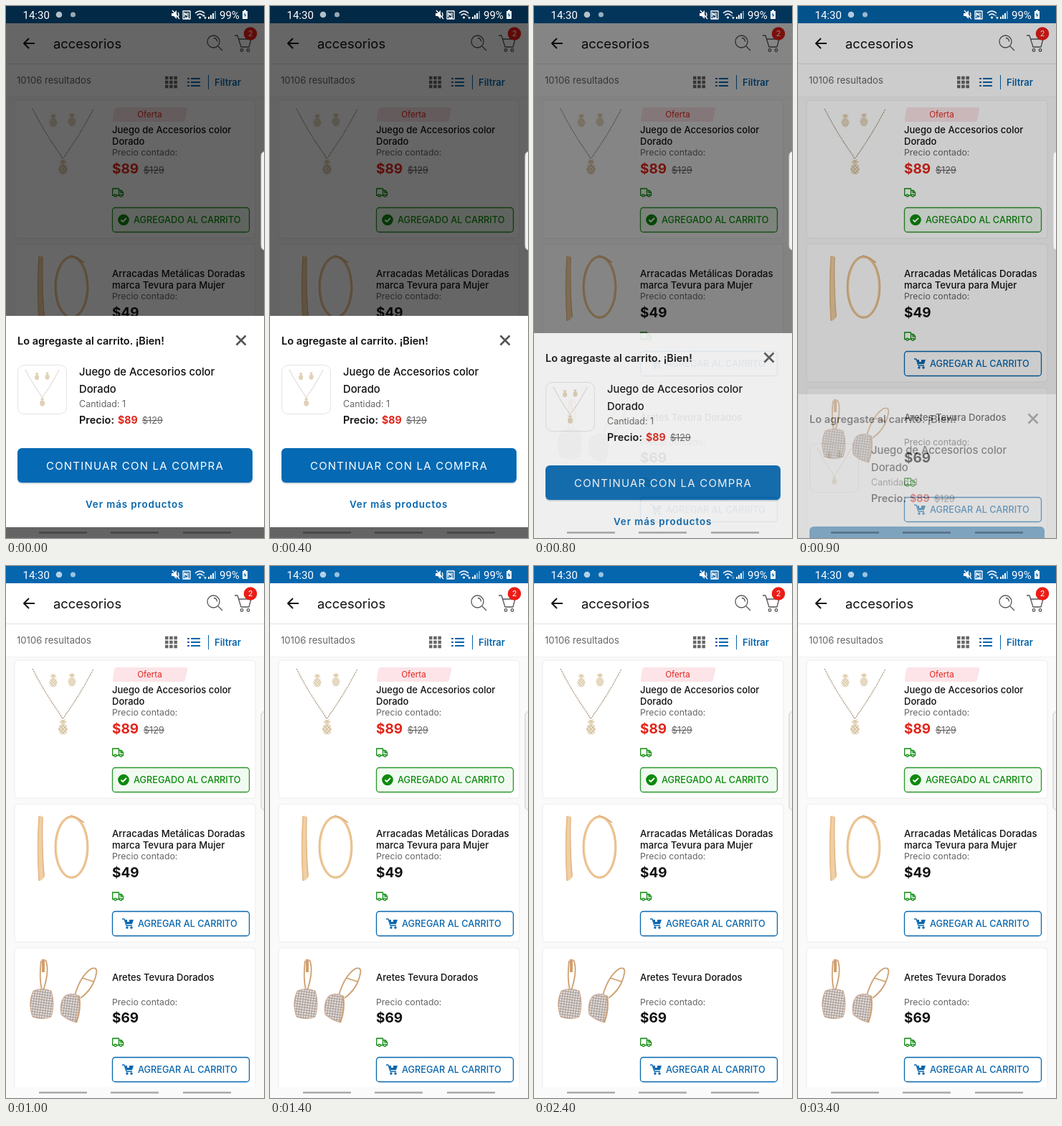
An HTML page for the animation above (3500 ms loop, 360 by 740 pixels).

```html
<!DOCTYPE html>
<html lang="es">
<head>
<meta charset="utf-8">
<title>Carrito</title>
<style>
html, body { margin: 0; height: 100%; overflow: hidden; background: #fafafa; }
svg { display: block; width: 360px; height: 740px; font-family: Inter, sans-serif; font-size: 13px; fill: #111; }
.status { font: 15px Roboto, sans-serif; fill: #fff; }
.grey { fill: #666; }
.red { fill: #e1251b; }
.blue { fill: #0566ae; }
.green { fill: #0c8a0c; }
.small { font-size: 12.3px; }
.old { font-size: 12.6px; fill: #666; text-decoration: line-through; }
.price { font-size: 19px; font-weight: 700; }
.name { font-weight: 450; }
.label { font-size: 12.7px; font-weight: 450; }
.bold { font-size: 14.5px; font-weight: 600; }
.line { fill: none; stroke-width: 1.3; stroke-linejoin: round; }
.card { fill: #fff; stroke: #ececec; }
</style>
</head>
<body>
<svg viewBox="0 0 360 740">
  <defs>
    <pattern id="gems" width="3.600" height="3.600" patternUnits="userSpaceOnUse" patternTransform="rotate(8)">
      <rect width="3.600" height="3.600" fill="#a89c96"/><circle cx="1.800" cy="1.800" r="1.400" fill="#ebe8e7"/>
    </pattern>
    <pattern id="gold" width="3" height="3" patternUnits="userSpaceOnUse" patternTransform="rotate(45)">
      <rect width="3" height="3" fill="#cdb893"/><circle cx="1.500" cy="1.500" r="1.200" fill="#faf4e8"/>
    </pattern>
    <g id="pineapple">
      <ellipse rx="5.500" ry="6.500" fill="url(#gold)"/>
      <path d="M0-6L-5-9L-2-9.500L-3-12L0-11L3-12L2-9.500L5-9Z" fill="#e0cfae"/>
    </g>
    <g id="necklace">
      <path d="M37 143Q55 178 76 207Q78 212 79 212Q81 211 83 207Q104 178 122 143" class="line" stroke="#ab9a85" stroke-dasharray="2 1"/>
      <use href="#pineapple" x="66" y="162"/>
      <use href="#pineapple" x="92" y="161"/>
      <use href="#pineapple" transform="translate(79.500 227) scale(1.150)"/>
    </g>
    <g id="delivery" class="line" stroke="#0c8a0c">
      <path d="M3 10.500H.7V1H9.500V10.500H6M9.500 3.500H13L15.500 6.500V10.500H14M9.500 10.500H10.500M12 3.500V6.500H15"/>
      <circle cx="4.500" cy="10.700" r="1.600"/><circle cx="12.300" cy="10.700" r="1.600"/>
    </g>
    <g id="add">
      <rect x="148.500" y=".5" width="191" height="34" rx="4" fill="#fff" stroke="#0566ae" stroke-width="1.300"/>
      <path d="M162 11H165L168 20H176" class="line" stroke="#0566ae"/>
      <path d="M166 12H169V15H172V12H178L176 18H168Z" class="blue"/>
      <circle cx="169" cy="23" r="1.700" class="blue"/><circle cx="175" cy="23" r="1.700" class="blue"/>
      <text x="184" y="22" class="blue label">AGREGAR AL CARRITO</text>
    </g>
  </defs>

  <rect width="360" height="740" fill="#fafafa"/>
  <rect y="24" width="360" height="102" fill="#fff"/>
  <path d="M0 80.500H360" stroke="#e2e2e2"/>
  <path d="M0 126.500H360" stroke="#f1f1f1"/>
  <rect width="360" height="24" fill="#0566ae"/>

  <path d="M40 52H25M32 45L25 52L32 59" class="line" stroke="#151515" style="stroke-width:2"/>
  <text x="66" y="58.500" font-size="18.400">accesorios</text>
  <g class="line" stroke="#555" style="stroke-width:1.300">
    <circle cx="289.500" cy="49.500" r="8.500"/><path d="M296 56L302 62M290 44.500Q294.500 45 294.500 49.500"/>
    <path d="M319 41H323L328 57H339L342 46H325"/>
    <circle cx="329" cy="61.500" r="1.800"/><circle cx="338" cy="61.500" r="1.800"/>
  </g>
  <circle cx="341" cy="38.500" r="9.300" fill="#ed1c16"/>
  <text x="341" y="42.300" font-size="11" text-anchor="middle" style="fill:#fff">2</text>

  <text x="15" y="107.500" font-size="13.100" class="grey">10106 resultados</text>
  <path d="M222 100H239M222 106H239M222 112H239" stroke="#666" stroke-width="4.500" stroke-dasharray="4.500 1.700"/>
  <path d="M258 101H271M258 106H271M258 111H271M253 101H256M253 106H256M253 111H256" stroke="#0566ae" stroke-width="2"/>
  <path d="M282.500 96V116" stroke="#0566ae"/>
  <text x="291" y="110.500" class="blue" font-weight="600">Filtrar</text>

  <rect x="12" y="131" width="336" height="192" rx="4" class="card"/>
  <use href="#necklace"/>
  <path d="M154 141H251Q254 141 253 144L250 158Q249 161 246 161H151Q148 161 149 158L151 144Q152 141 154 141Z" fill="#fce4e8"/>
  <text x="200.500" y="155" font-size="11.600" text-anchor="middle" class="red">Oferta</text>
  <text x="148" y="176.500" class="name">Juego de Accesorios color</text>
  <text x="148" y="192.500" class="name">Dorado</text>
  <text x="148" y="208" class="grey small">Precio contado:</text>
  <text x="148" y="232.500" class="red price">$89</text>
  <text x="192" y="232.500" class="old">$129</text>
  <use href="#delivery" x="148" y="253"/>
  <rect x="148.500" y="280.500" width="191" height="34" rx="4" fill="#f1faf1" stroke="#2b962b" stroke-width="1.300"/>
  <circle cx="164" cy="297.500" r="7.800" class="green"/>
  <path d="M160.500 297.500L163 300L168 295" class="line" stroke="#fff" style="stroke-width:1.800"/>
  <text x="178" y="302" class="green label">AGREGADO AL CARRITO</text>

  <rect x="12" y="331" width="336" height="192" rx="4" class="card"/>
  <path d="M46 348Q42 392 46 438Q50 438 54 432Q50 392 51 349Q48 346 46 348Z" fill="#f0cfa4"/>
  <g class="line" stroke="#e2b27c">
    <path d="M46 348Q43 392 46 438M51 349Q50 392 53 432"/>
    <ellipse cx="91.500" cy="391" rx="22" ry="42" stroke="#efc998" style="stroke-width:3"/>
    <ellipse cx="91.500" cy="391" rx="23.300" ry="43.300" style="stroke-width:1"/>
    <path d="M90 347L99 350L109 357" style="stroke-width:1.800"/>
  </g>
  <text x="148" y="376.500" class="name" font-size="13.200">Arracadas Metálicas Doradas</text>
  <text x="148" y="392.500" class="name" font-size="13.200">marca Tevura para Mujer</text>
  <text x="148" y="408" class="grey small">Precio contado:</text>
  <text x="148" y="432.500" class="price">$49</text>
  <use href="#delivery" x="148" y="453"/>
  <use href="#add" y="480"/>

  <path d="M12 740V535Q12 531 16 531H344Q348 531 348 535V740" class="card"/>
  <g class="line" stroke="#cf9f70" style="stroke-width:1.800">
    <path d="M50 590Q46 572 49 549M55 548Q59 556 57 570Q55 582 52 590"/>
    <path d="M52 547V565" style="stroke-width:4"/>
    <path d="M96 597Q104 570 119 560Q128 557 126 567Q122 588 104 601M106 573L122 578"/>
  </g>
  <path d="M38 591Q50 586 63 591Q69 610 63 627Q50 632 37 627Q30 608 38 591Z" fill="url(#gems)" stroke="#cda488"/>
  <path d="M81 599Q91 592 102 598Q105 617 98 635Q86 632 77 624Q74 610 81 599Z" fill="url(#gems)" stroke="#cda488"/>
  <path d="M102 598Q105 617 98 635" class="line" stroke="#cf9f70" style="stroke-width:2.200"/>
  <text x="148" y="576.500" class="name">Aretes Tevura Dorados</text>
  <text x="148" y="611" class="grey small">Precio contado:</text>
  <text x="148" y="635" class="price">$69</text>
  <use href="#delivery" x="148" y="656"/>
  <use href="#add" y="683"/>
  <rect y="725" width="360" height="15" fill="#fafafa"/>

  <rect id="scrim" width="360" height="740" fill="#000"/>

  <g id="sheet">
    <rect y="431" width="360" height="294" fill="#fff"/>
    <text x="16" y="470.500" class="bold">Lo agregaste al carrito. ¡Bien!</text>
    <path d="M321.500 458.500L334.500 471.500M334.500 458.500L321.500 471.500" stroke="#555" stroke-width="2.600"/>
    <rect x="16.500" y="499.500" width="68" height="68" rx="9" fill="#fff" stroke="#e4e4e4"/>
    <use href="#necklace" transform="translate(6.500 426.600) scale(.555)"/>
    <text x="102" y="514" class="name" font-size="14.800">Juego de Accesorios color</text>
    <text x="102" y="538" class="name" font-size="14.800">Dorado</text>
    <text x="102" y="558" font-size="12.500" class="grey">Cantidad: 1</text>
    <text x="102" y="580.500" class="bold">Precio:</text>
    <text x="156" y="580.500" font-size="14.200" font-weight="700" class="red">$89</text>
    <text x="190" y="580.500" class="old">$129</text>
    <rect x="16" y="617" width="328" height="48" rx="6" fill="#d5dde4"/>
    <rect x="16" y="615" width="328" height="48" rx="6" fill="#0569b3"/>
    <text x="56" y="644.500" font-size="15" letter-spacing="1.200" style="fill:#fff">CONTINUAR CON LA COMPRA</text>
    <text x="111" y="698" font-size="13.400" font-weight="600" letter-spacing=".9" class="blue">Ver más productos</text>
  </g>

  <g class="status">
    <text x="23.500" y="17.500">14:30</text>
    <circle cx="74" cy="12" r="4.300" opacity=".7"/>
    <circle cx="93.500" cy="12" r="3.500" opacity=".6"/>
    <path d="M231 10H234L238 6V18L234 14H231Z"/>
    <path d="M232 6L242 18" class="line" stroke="#fff"/>
    <path d="M240 9Q242 12 240 15" class="line" stroke="#fff"/>
    <rect x="247" y="7" width="10" height="11" class="line" stroke="#fff"/>
    <path d="M249 15V9.500L252 13V9.500M254 9V16M249 16.500H255" class="line" stroke="#fff"/>
    <path d="M264 10Q270.500 4 277 10M266.500 13Q270.500 9 274.500 13" class="line" stroke="#fff" style="stroke-width:1.600"/>
    <circle cx="270.500" cy="16" r="1.600"/>
    <path id="up" d="M274 14.500L276 11.500L278 14.500Z"/>
    <path id="down" d="M276 15.500H280L278 18.500Z"/>
    <path d="M283 18V15M286 18V12.500" stroke="#fff" stroke-width="2"/>
    <path id="bar" d="M289 18V10" stroke="#fff" stroke-width="2"/>
    <path d="M292 18V7" stroke="#fff" stroke-width="2" opacity=".45"/>
    <text x="298" y="17.500">99%</text>
    <path d="M330 7H332V5.500H335V7H337V18H330Z"/>
    <path d="M334 8.500L331.500 13H333.500L333 16.500L335.500 12H333.500Z" fill="#0566ae"/>
  </g>
  <path d="M361 202.500Q356 203 356 209V333Q356 339 361 339.500Z" fill="#f4f4f4" stroke="#c8c8c8"/>
  <path d="M46 732.500H113M146 732.500H213M247 732.500H314" stroke="#000" stroke-width="2.600" stroke-opacity=".32"/>
</svg>
<script>
const el = id => document.getElementById(id);
const show = (id, opacity) => el(id).setAttribute('opacity', opacity);

// [start ms, sheet offset, sheet opacity, scrim opacity]
const steps = [[0, 0, 1, .6], [800, 24, .87, .48], [900, 109, .38, .2], [1000, 300, 0, 0]];

function frame(now) {
  const t = now % 3500;
  const [, y, alpha, dim] = steps.findLast(s => s[0] <= t);
  el('sheet').setAttribute('transform', `translate(0 ${y})`);
  show('sheet', alpha);
  show('scrim', dim);

  const tick = Math.floor((t + 600) / 1000);
  show('up', tick % 2 ? .4 : 1);
  show('down', tick === 3 ? .4 : 1);
  show('bar', tick === 2 ? .45 : 1);
  requestAnimationFrame(frame);
}
frame(performance.now());
</script>
</body>
</html>
```
